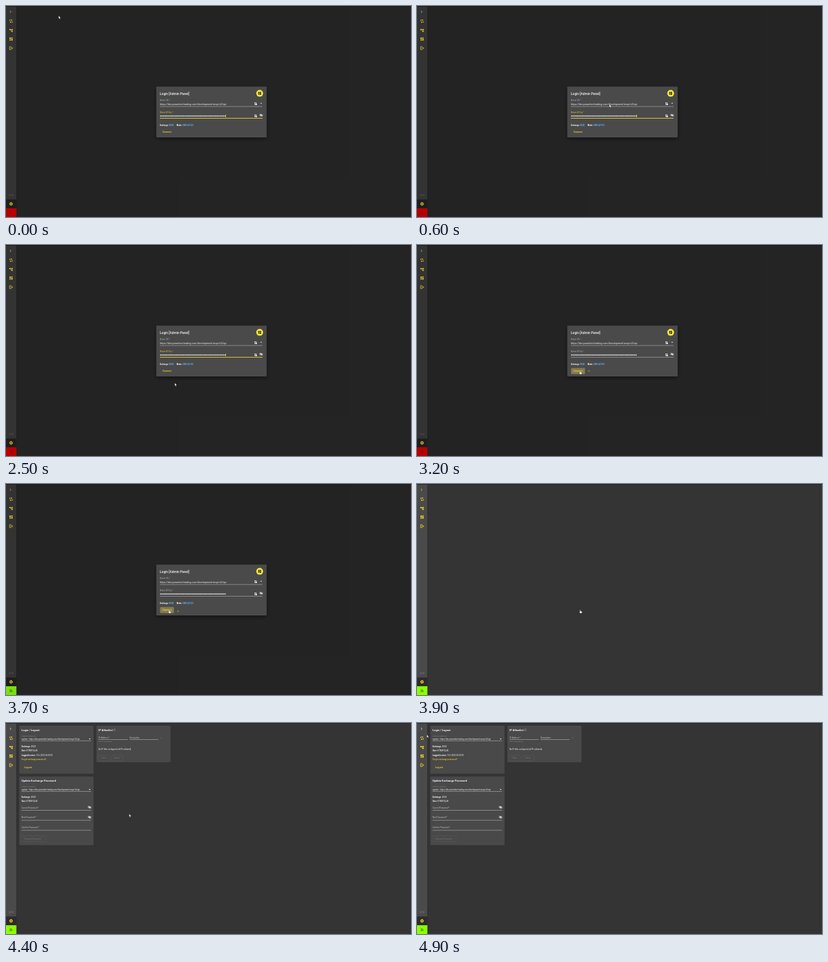
Animation, 600 px wide and 313 px high, one loop 5000 ms. Source, as an HTML page:

```html
<!DOCTYPE html>
<html lang="en">
<head>
<meta charset="utf-8">
<title>Admin panel login</title>
<style>
  html, body { margin: 0; width: 100%; height: 100%; overflow: hidden; background: #333; }
  svg { display: block; width: 100vw; height: 100vh; }
  text { font-family: Roboto, "Liberation Sans", sans-serif; white-space: pre; }
  .shadow { filter: drop-shadow(0 2px 3px rgba(0, 0, 0, .5)); }
  .soft { filter: drop-shadow(0 .4px .6px rgba(0, 0, 0, .4)); }
</style>
</head>
<body>
<svg id="stage" viewBox="0 0 600 313" preserveAspectRatio="none"></svg>
<script>
const YELLOW = '#fddc2e', WHITE = '#f4f4f4', GREY = '#a8a8a8', CARD = '#494949', DIM = '#6c6c6c', BLUE = '#64b5f6';
const URL_TEXT = 'https://dev.powerbot-trading.com/development/zeqo/v2/api';

const rect = (x, y, w, h, fill, more = '') =>
  `<rect x="${x}" y="${y}" width="${w}" height="${h}" fill="${fill}" ${more}/>`;
const text = (x, y, size, str, fill = WHITE, weight = 400) =>
  `<text x="${x}" y="${y}" font-size="${size}" fill="${fill}" font-weight="${weight}">${str}</text>`;
const path = (d, stroke, width = .6, fill = 'none') =>
  `<path d="${d}" stroke="${stroke}" stroke-width="${width}" fill="${fill}"/>`;
const at = (x, y, body) => `<g transform="translate(${x} ${y})">${body}</g>`;
const group = (id, body, more = '') => `<g id="${id}" ${more}>${body}</g>`;
const rule = (x, y, w, color = '#c4c4c4', h = .5) => rect(x, y, w, h, color);
const pair = (x, y, key, value) =>
  `<text x="${x}" y="${y}" font-size="2.85" fill="${WHITE}"><tspan font-weight="700">${key}:</tspan> ${value}</text>`;

// Icons, each centred on 0,0
const dashboard = (c, s = 1) => `<g transform="scale(${s})">` +
  rect(-2.3, -2.3, 2, 2.6, c) + rect(.3, -2.3, 2, 1.6, c) +
  rect(-2.3, .8, 2, 1.5, c) + rect(.3, -.2, 2, 2.5, c) + '</g>';
const sync = c => path('M-2-.2V-1.6H1.4M.5-2.5 1.5-1.6.5-.7M2 .2V1.6H-1.4M-.5 .7-1.5 1.6-.5 2.5', c, .8);
const tree = c => rect(-2.6, -1.8, 2, 1.7, c) + rect(.6, -1.8, 2, 1.7, c) + rect(.6, .7, 2, 1.7, c) +
  path('M-1-1H1M0-1V1.5H1', c, .5);
const logout = c => path('M.4-1.4V-2.2H-2.2V2.2H.4V1.4M-.8 0H2.4M1.3-1.2 2.5 0 1.3 1.2', c, .75);
const gear = c => `<circle r="1.6" fill="none" stroke="${c}" stroke-width="1.3"/>` +
  `<circle r="2.3" fill="none" stroke="${c}" stroke-width=".7" stroke-dasharray=".9 .9"/>`;
const eyeOff = c => path('M-2.5 0Q0-3 2.5 0Q0 3-2.5 0Z', c, .6) +
  `<circle r=".9" fill="${c}"/>` + path('M-2.1-2 2.1 2', c, .6);
const arrow = c => path('M-1.3-.6H1.3L0 .8Z', 'none', 0, c);
const copy = c => rect(-1.6, -1.7, 2.4, 2.6, 'none', `stroke="${c}" stroke-width=".6"`) +
  rect(-.4, -.4, 2, 2.2, c);

const sidebar =
  rect(0, 0, 600, 313, '#343434') + rect(15.4, 0, .9, 313, '#262626') + rect(0, 0, 15.4, 313, '#4a4a4a') +
  rect(0, 287, 15.4, 13, '#2c2c2c') + rect(0, 0, 600, .9, '#242424') +
  text(4.6, 282, 2.8, '2.1.0', '#a0a0a0');

const icons =
  at(7.5, 22.5, sync(YELLOW)) + at(7.5, 36, tree(YELLOW)) + at(7.5, 49, dashboard(YELLOW)) +
  at(7.5, 62.5, logout(YELLOW)) + at(7.5, 293.5, gear(YELLOW));

const status = rect(0, 300, 15.4, 13, '#b30000', 'id="light"') +
  at(7.5, 306.7, group('offline', path('M-1.6-1.6 1.6 1.6M1.6-1.6-1.6 1.6', '#6d0000', .7)) +
    group('online', path('M-1.8-.2A2 2 0 0 1 .2 1.8M-1.8-1.8A3.6 3.6 0 0 1 1.8 1.8', '#24490a', .7) +
      '<circle cx="-1.4" cy="1.4" r=".6" fill="#24490a"/>'));

const card = (x, y, w, h, id = '') => rect(x, y, w, h, CARD, `rx=".8" class="soft" id="${id}"`);
const outline = (x, y, w, h) => rect(x, y, w, h, 'none', 'rx=".7" stroke="#5e5e5e" stroke-width=".4"');
const ghost = (x, w, tx, label, y) =>
  outline(x, y, w, 8.4) + text(tx, y + 5.4, 3.1, label, DIM, 500);

// Instance picker with the account lines under it
const instance = y =>
  text(23, y, 2.45, 'Voltamic Instance *', GREY) +
  text(23, y + 4.5, 2.8, 'system - ' + URL_TEXT) + rule(23, y + 6.5, 103) +
  at(124, y + 3.7, arrow(WHITE)) +
  pair(23, y + 15.7, 'Exchange', 'ZEQO') + pair(23, y + 22.2, 'User', 'BTRMVQLAE');
const password = (y, label, eye) =>
  text(23, y, 2.95, label, '#c4c4c4') + rule(23, y + 2.6, 103) + (eye ? at(123.8, y - 1.6, eyeOff(WHITE)) : '');

const login = card(19.5, 4, 110.3, 71.5) + text(23, 12, 4.1, 'Login / Logout', WHITE, 700) + instance(20) +
  pair(23, 48.6, 'Logged in since', '15.6.2022 06:55:09') +
  text(23, 55.2, 2.95, 'Forgot exchange password?', YELLOW) + text(27, 67.2, 3.4, 'Log out', YELLOW, 500);

const update = card(19.5, 79.2, 110.3, 102.3) +
  text(23, 87, 4.1, 'Update Exchange Password', WHITE, 700) + instance(95) +
  password(126.6, 'Current Password *', true) + password(141.3, 'New Password *', true) +
  password(156.2, 'Confirm Password *', false) + ghost(23, 35, 26.8, 'Change Password', 167.5);

const allow = card(133.8, 4, 110, 46, 'allowCard') + text(137, 12, 4.1, 'IP Allowlist', WHITE, 700) +
  at(160.5, 10.2, `<circle r="1.6" fill="none" stroke="${GREY}" stroke-width=".4"/>` + rect(-.2, -.3, .4, 1.2, GREY) + rect(-.2, -.9, .4, .4, GREY)) +
  text(137, 23, 2.95, 'IP Address *', '#c4c4c4') + rule(137, 24.5, 43.5) +
  text(137, 28.1, 2.2, 'IPv4 or IPv6 address', GREY) +
  text(183, 23, 2.95, 'Description', '#c4c4c4') + rule(183, 24.5, 43) +
  at(230.5, 22, path('M-1 0H1M0-1V1', DIM, .5)) +
  group('noFilter', text(137, 40, 2.85, 'No IP filter configured (all IPs allowed).')) +
  group('allowButtons', ghost(137, 16, 141.5, 'Save', 33.5) + ghost(156.3, 16.5, 160.5, 'Reset', 33.5));

let dots = '';
for (let i = 0; i < 43; i++) dots += `<circle cx="${229.2 + i * 2.27}" cy="163.2" r=".85" fill="${WHITE}"/>`;

const dialog = rect(222.6, 119.6, 163.6, 75.4, '#4a4a4a', 'rx="1" class="shadow"') +
  text(228, 131.6, 4.85, 'Login [Admin Panel]', WHITE, 500) +
  at(375.8, 129.6, `<circle r="5" fill="#ffeb3b"/>` + dashboard('#222', .95)) +
  text(228, 140.6, 2.6, 'Market URL *', GREY) + text(228, 147, 3.68, URL_TEXT) + rule(228, 148.8, 152) +
  at(370, 145.2, copy(WHITE)) + at(378, 144.4, arrow(WHITE)) +
  text(228, 158.6, 2.6, '<tspan id="keyLabel">Market API Key *</tspan>') + dots +
  rect(228, 166, 152, .7, YELLOW, 'id="keyLine"') + rect(325.4, 160.8, .5, 4.6, YELLOW, 'id="caret"') +
  at(370, 163.2, copy(WHITE)) + at(378, 162, eyeOff(WHITE)) +
  `<text x="228" y="177.6" font-size="2.75" font-weight="700" fill="${WHITE}">Exchange: <tspan fill="${BLUE}">ZEQO</tspan></text>` +
  `<text x="252.8" y="177.6" font-size="2.75" font-weight="700" fill="${WHITE}">Mode: <tspan fill="${BLUE}" font-weight="500">SIMULATION</tspan></text>` +
  rect(228.3, 182.6, 20.5, 9, '#857d4e', 'rx=".8" id="pressed"') +
  text(232, 188.2, 3.45, 'Connect', YELLOW, 500) +
  group('spinner', at(254.8, 187.8, group('turn', path('M-1.3 .4A1.4 1.4 0 0 0 1.3 .4', YELLOW, .6))));

const pointer = group('arrowCursor', path('M0 0V4.2L1 3.3 1.7 4.9 2.4 4.6 1.7 3.1H3Z', '#222', .25, '#fff')) +
  group('handCursor', path('M.8 0Q1.4 0 1.4.6V2L3 2.3Q3.5 2.5 3.4 3.2L3 4.9H.8L-.5 3Q-.2 2.4.3 2.9V.6Q.3 0 .8 0Z', '#222', .25, '#fff'));

const stage = document.getElementById('stage');
stage.innerHTML = sidebar + group('cards', login + update + allow) +
  rect(0, 0, 600, 313, '#000', 'id="veil"') + group('icons', icons) +
  group('chevron', path('M6 7 7.4 8.6 6 10.2', WHITE, .7)) + status +
  group('dialog', dialog) + group('cursor', pointer);

const $ = id => document.getElementById(id);
const set = (id, name, value) => $(id).setAttribute(name, value);
const show = (id, on) => set(id, 'opacity', +on);

// Pointer route: time, x, y
const route = [
  [0, 78, 14.6], [100, 95, 21], [300, 165, 62], [600, 285, 146], [700, 292, 153], [1100, 292, 153],
  [1300, 305.4, 185.6], [1700, 305.4, 185.6], [1800, 306, 190], [2000, 295, 203], [2300, 252, 207],
  [2500, 250, 204.8], [2700, 244, 197], [2900, 240.6, 186.8], [3900, 241, 186.8], [4000, 240, 186],
  [4100, 240, 186], [4300, 215, 160], [4500, 150, 110], [4700, 86, 66], [4800, 45, 38], [4900, 14.6, 17.4]
];

function pointAt(t) {
  const i = route.findIndex(p => p[0] >= t);
  if (i < 1) return route[0].slice(1);
  const [t0, x0, y0] = route[i - 1], [t1, x1, y1] = route[i];
  const k = (t - t0) / (t1 - t0);
  return [x0 + (x1 - x0) * k, y0 + (y1 - y0) * k];
}

function draw(t) {
  const clicked = t >= 3000, connected = t >= 3500, inside = t >= 4000, filled = t >= 4200;
  const hand = t >= 2800 && t < 4000;
  const veil = t < 3800 ? .31 : t < 3900 ? .16 : 0;

  show('veil', 1);
  set('veil', 'fill-opacity', veil);
  set('icons', 'opacity', veil > .2 ? .86 : 1);
  set('dialog', 'opacity', t < 3800 ? 1 : t < 3900 ? .5 : 0);
  set('chevron', 'opacity', veil > .2 ? .8 : 1);
  $('chevron').firstChild.setAttribute('stroke', connected && !inside ? YELLOW : WHITE);

  set('light', 'fill', !connected ? '#b80000' : veil ? '#7be010' : '#8cff00');
  show('offline', !connected);
  show('online', connected);

  set('keyLabel', 'fill', clicked ? GREY : '#d8bd2c');
  set('keyLine', 'fill', clicked ? '#c4c4c4' : YELLOW);
  set('keyLine', 'height', clicked ? .5 : .8);
  show('caret', !clicked);
  show('pressed', clicked);
  show('spinner', t >= 3100);
  set('turn', 'transform', `rotate(${(t - 3700) * .36})`);

  show('cards', inside);
  set('allowCard', 'height', filled ? 54.4 : 46);
  show('noFilter', filled);
  set('allowButtons', 'transform', `translate(0 ${filled ? 14.6 : 0})`);

  set('cursor', 'transform', `translate(${pointAt(t).join(' ')})`);
  show('arrowCursor', !hand);
  show('handCursor', hand);
}

const start = performance.now();
function tick() {
  const t = (performance.now() - start) % 5000;
  draw(Math.floor(t / 100) * 100);
  requestAnimationFrame(tick);
}
draw(0);
requestAnimationFrame(tick);
</script>
</body>
</html>
```
